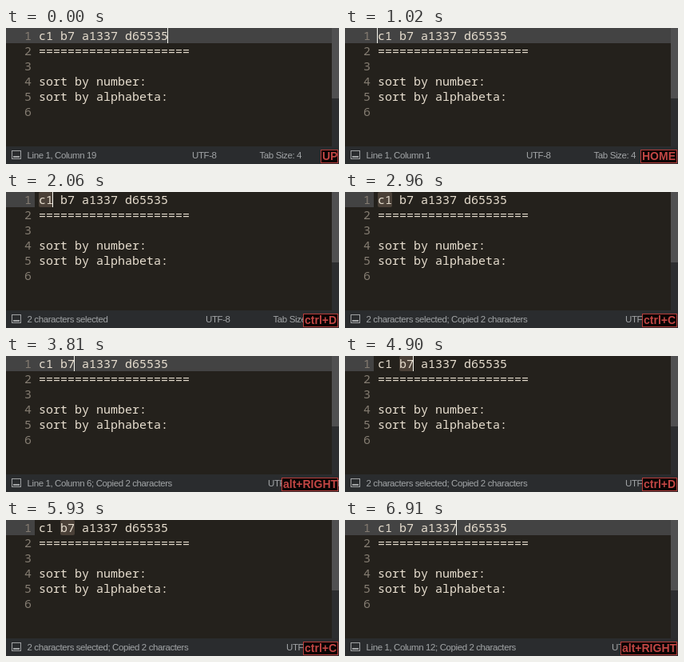
Animation, 417 px wide and 170 px high, one loop 8000 ms. Source, as an HTML page with a canvas:

```html
<!DOCTYPE html>
<html lang="en">
<head>
<meta charset="utf-8">
<title>Editor shortcuts</title>
<style>
html, body { margin: 0; width: 100%; height: 100%; overflow: hidden; background: #24211c; }
canvas { display: block; width: 417px; height: 170px; }
</style>
</head>
<body>
<canvas id="stage" width="417" height="170"></canvas>
<script>
const ctx = document.getElementById('stage').getContext('2d');
const LOOP = 8000, CHAR = 9, ROW = 19, TEXT_X = 41;
const CODE = '15px "Noto Sans Mono", monospace';
const STATUS = '11.5px "Liberation Sans", sans-serif';
const KEY = 'bold 14px "Liberation Sans", sans-serif';
const lines = ['c1 b7 a1337 d65535', '='.repeat(21), '', 'sort by number:', 'sort by alphabeta:', ''];
const copied = '; Copied 2 characters';
const selected = '2 characters selected';

// col: caret column; sel: first selected column; enc: x of the encoding label
const steps = [
  { at: 0,    col: 18, caret: true,  key: 'UP',        keyX: 394, enc: 233, status: 'Line 1, Column 19' },
  { at: 1020, col: 0,  caret: true,  key: 'HOME',      keyX: 370, enc: 227, status: 'Line 1, Column 1' },
  { at: 2060, col: 2,  caret: true,  key: 'ctrl+D',    keyX: 372, enc: 250, status: selected, sel: 0 },
  { at: 2960, col: 2,  caret: false, key: 'ctrl+C',    keyX: 372, enc: 351, status: selected + copied, sel: 0 },
  { at: 3810, col: 5,  caret: true,  key: 'alt+RIGHT', keyX: 345, enc: 328, status: 'Line 1, Column 6' + copied },
  { at: 4900, col: 5,  caret: true,  key: 'ctrl+D',    keyX: 372, enc: 351, status: selected + copied, sel: 3 },
  { at: 5930, col: 5,  caret: false, key: 'ctrl+C',    keyX: 372, enc: 351, status: selected + copied, sel: 3 },
  { at: 6910, col: 11, caret: true,  key: 'alt+RIGHT', keyX: 345, enc: 334, status: 'Line 1, Column 12' + copied }
];

function box(x, y, w, h, color) {
  ctx.fillStyle = color;
  ctx.fillRect(x, y, w, h);
}

function outline(x, y, w, h, color) {
  ctx.strokeStyle = color;
  ctx.lineWidth = 1;
  ctx.strokeRect(x + 0.5, y + 0.5, w - 1, h - 1);
}

function text(str, x, y, font, color, spacing = 0) {
  ctx.font = font;
  ctx.letterSpacing = spacing + 'px';
  ctx.fillStyle = color;
  ctx.fillText(str, x, y);
}

function drawEditor(step) {
  const hasSel = step.sel !== undefined;
  box(0, 0, 417, 148, '#24211c');
  box(0, 0, hasSel ? 36 : 408, ROW, '#434343');
  if (hasSel) {
    ctx.fillStyle = '#4b4138';
    ctx.beginPath();
    ctx.roundRect(TEXT_X + step.sel * CHAR, 0, (step.col - step.sel) * CHAR, ROW, 2);
    ctx.fill();
  }
  lines.forEach((line, i) => {
    const y = 15 + i * ROW;
    text(String(i + 1), 23, y, CODE, '#857d72');
    text(line, TEXT_X, y, CODE, '#e8dfd0');
  });
  if (step.caret) box(TEXT_X - 1 + step.col * CHAR, 0, 1, ROW, '#f8f8f0');
  box(408, 0, 9, 148, '#2c2d2f');
  box(408, 0, 9, 88, '#505051');
}

function drawStatus(step) {
  const label = (str, x) => text(str, x, 163, STATUS, '#a2a5a7', -0.4);
  box(0, 148, 417, 22, '#2a2c2e');
  outline(7, 153, 12, 11, '#a0a2a3');
  box(9, 160, 8, 2, '#a0a2a3');
  label(step.status, 26.5);
  label('UTF-8', step.enc);
  label('Tab Size: 4', step.enc + 84.5);
}

function drawKey(step) {
  const w = 416 - step.keyX;
  box(step.keyX, 152, w, 17, '#080404');
  outline(step.keyX, 152, w, 17, '#b83c3a');
  text(step.key, step.keyX + 2, 165, KEY, '#c24644');
}

function frame() {
  const t = performance.now() % LOOP;
  const step = steps.findLast(s => s.at <= t);
  drawEditor(step);
  drawStatus(step);
  drawKey(step);
  requestAnimationFrame(frame);
}

frame();
</script>
</body>
</html>
```
